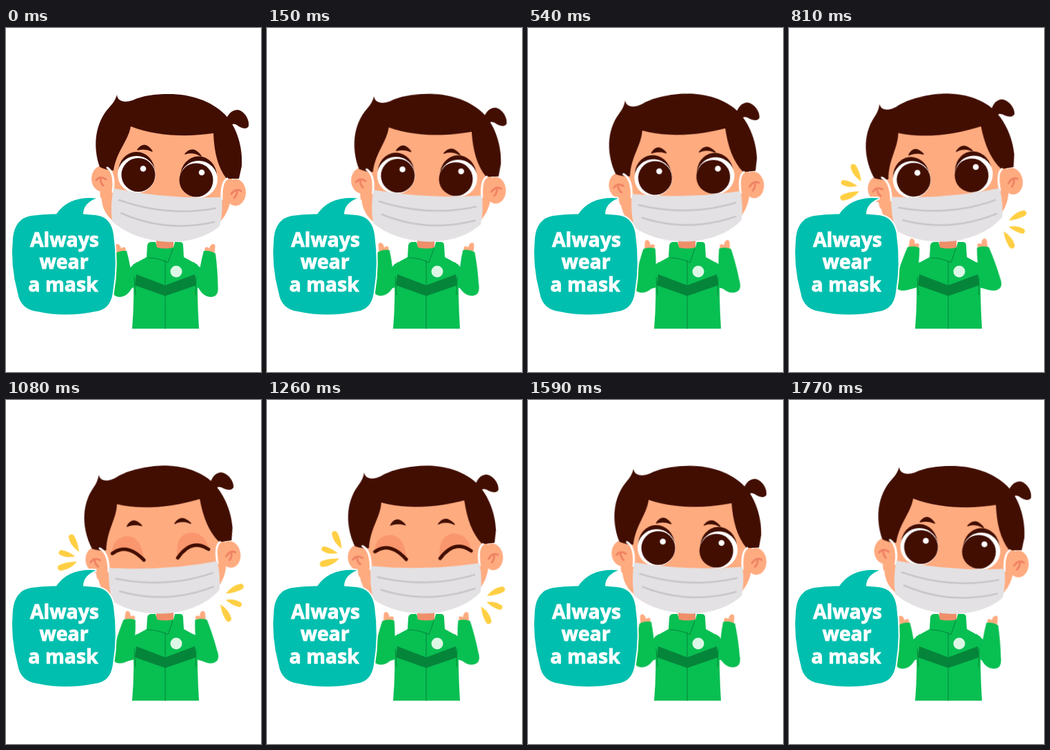
An HTML page that plays this animation: 370 by 500 pixels, repeating every 1800 ms.

```html
<!DOCTYPE html>
<html lang="en">
<head>
<meta charset="utf-8">
<title>Always wear a mask</title>
<style>
  html, body { margin: 0; width: 100%; height: 100%; overflow: hidden; background: #fff; }
  svg { display: block; width: 370px; height: 500px; }

  .head, .arm, .burst, .open, .closed { animation: 1800ms linear infinite; }
  .head { transform-origin: 229px 285px; animation-name: tilt; }
  .arm { transform-origin: 166px 378px; animation-name: lift; }
  .burst { animation-name: pop; }
  .left { transform-origin: 118px 226px; }
  .right { transform-origin: 306px 290px; }
  .open { animation-name: open; animation-timing-function: step-end; }
  .closed { animation-name: closed; animation-timing-function: step-end; }

  @keyframes tilt { 50% { transform: rotate(-10.4deg); } }
  @keyframes lift { 50% { transform: translateY(-10px) rotate(17.5deg); } }
  @keyframes pop {
    0%, 33.3% { transform: scale(0); }
    38% { transform: scale(1.12); }
    41%, 83% { transform: scale(1); }
    87%, 100% { transform: scale(0); }
  }
  @keyframes open { 0%, 72% { opacity: 1; } 52% { opacity: 0; } }
  @keyframes closed { 0%, 72% { opacity: 0; } 52% { opacity: 1; } }

  .green { fill: #08bf52; }
  .dark { fill: #05853a; }
  .skin { fill: #ffab80; }
  .hair { fill: #420e02; }
  .white { fill: #fff; }
  .line { fill: none; stroke-linecap: round; stroke-linejoin: round; }
  .brow { stroke: #420e02; stroke-width: 1.5; stroke-linejoin: round; }
  .strap { stroke: #fff; stroke-width: 3; }
  .fold { stroke: #c8c6c8; stroke-width: 2.6; }
  .ear { stroke: #ef8264; stroke-width: 3; }
  .lash { stroke: #420e02; stroke-width: 5; }
  .seam { stroke: #05853a; stroke-width: 1; }
  .spark { fill: #ffcf43; }
  .bubble { fill: #00bfae; stroke: #fff; stroke-width: 4; paint-order: stroke; }
  text {
    font: 700 28.4px "Open Sans", "Noto Sans", sans-serif;
    fill: #fff; stroke: #fff; stroke-width: .9; text-anchor: middle;
  }
</style>
</head>
<body>
<svg viewBox="0 0 370 500">
  <defs>
    <path id="drop" d="M0 0Q13 -7 24 -4.2A4.2 4.2 0 0 1 24 4.2Q13 5 0 0Z"/>
    <g id="forearm">
      <path class="skin" d="M160 329L158.500 319Q158 313.500 162 314Q166 315 167 320.500Q171 317 173.500 320Q174 324 173 329Z"/>
      <path class="green" d="M158 328Q166 323 175 324Q181 345 184 375Q177 391 164 391Q153 390 154.500 376Q155 350 158 328Z"/>
    </g>
    <path id="sleeve" class="green" d="M190 340L178 350L171 381L190 376Z"/>
  </defs>

  <!-- jacket -->
  <rect x="218" y="298" width="25" height="24" fill="#ee8f6a"/>
  <use href="#sleeve"/>
  <use href="#sleeve" transform="translate(462 0) scale(-1 1)"/>
  <path class="green" d="M204 333L205 316Q206 311 211 311H217L219 319Q231 322 243 319L245 311H252Q257 311 257 316L258 333L278 344Q277 390 280 437H183Q187 390 184 344Z"/>
  <path class="dark" d="M189 358L231 374L274 358L276 374L231 389.500L187 374Z"/>
  <path class="line seam" d="M231 338V437M206 334Q221 334 235 341L242 321M186 362L188 388M276 362L275 388"/>
  <circle cx="247" cy="354" r="8.500" fill="#dcf7e5"/>

  <g class="head">
    <g class="spark" transform="rotate(4.16 229 285)">
      <g class="burst left">
        <use href="#drop" transform="translate(111 212) rotate(-113)"/>
        <use href="#drop" transform="translate(105 218) rotate(199) scale(.87)"/>
        <use href="#drop" transform="translate(107 226) rotate(164) scale(1.050)"/>
      </g>
      <g class="burst right">
        <use href="#drop" transform="translate(319 288) rotate(-21)"/>
        <use href="#drop" transform="translate(318 297) rotate(23) scale(.87)"/>
        <use href="#drop" transform="translate(310 303) rotate(65)"/>
      </g>
    </g>

    <ellipse class="skin" cx="140" cy="219" rx="16" ry="19"/>
    <ellipse class="skin" cx="333" cy="239" rx="15" ry="19.500"/>
    <path class="skin" d="M150 135C138 180 133 226 138 254C144 279 174 305 232 307C286 307 315 288 324 258C330 230 330 180 318 135Z"/>
    <path class="line ear" d="M131 221Q137 214 145 220M137 218Q137 225 141 229M341 237Q334 232 327 241M335 236Q336 242 331 247"/>

    <path class="hair" d="M161 97C162 107 172 109 184 105C199 98 216 96 236 96C269 96 297 106 317 125C336 144 344 176 342 201L338 219H320C307 202 302 180 301 153C261 159 217 157 181 143C177 165 161 178 156 207Q146 207 136 202C126 174 128 138 151 114Q158 107 161 97Z"/>
    <path class="hair" d="M318 142C318 131 325 119 336 119C346 120 354 134 352 143C349 148 341 146 335 141Q329 137 325 143Q320 148 318 142Z"/>
    <path class="hair brow" d="M191 177Q201 163 212 179Q202 174 191 177ZM260 183Q271 170 283 186Q271 179 260 183Z"/>

    <g class="open">
      <ellipse class="hair" cx="189.500" cy="209" rx="26.500" ry="29"/>
      <ellipse class="hair" cx="279.500" cy="215.500" rx="26.500" ry="29"/>
      <ellipse class="white" cx="189.500" cy="213" rx="27.500" ry="27"/>
      <ellipse class="white" cx="279.500" cy="220" rx="27.500" ry="27"/>
      <circle class="hair" cx="192" cy="213.500" r="24.500"/>
      <circle class="hair" cx="276" cy="221" r="24.500"/>
      <circle class="white" cx="199" cy="204.500" r="4.300"/>
      <circle class="white" cx="284" cy="210" r="4.300"/>
    </g>
    <g class="closed">
      <path fill="#fa966e" d="M164 213Q166 191 188 191Q210 194 208 229Q187 200 164 213ZM257 233Q256 200 280 199Q303 203 303 227Q281 207 257 233Z"/>
      <path class="line lash" d="M164 213Q187 200 208 229M257 233Q281 207 303 227"/>
    </g>

    <path class="line strap" d="M155 238Q159 211 147 203M137 248Q139 270 154 281M313 249Q312 224 321 219M325 262Q323 277 310 287"/>
    <path fill="#e3e1e3" d="M156 233Q232 249 313 246Q315 268 310 288Q283 311 236 311Q184 308 154 281Q151 257 156 233Z"/>
    <path class="line fold" d="M164 250Q234 275 304 262M167 269Q232 298 302 282"/>
  </g>

  <g class="arm"><use href="#forearm"/></g>
  <g transform="translate(462 0) scale(-1 1)">
    <g class="arm"><use href="#forearm"/></g>
  </g>

  <path class="bubble" d="M36 273Q55 270 73 270.500Q91 244 131 247.500Q112 255 112 270.500L130 272Q152 274 156 300Q162 343 155 384Q152 409 130 412Q86 421 45 412Q21 409 17 385Q6 345 10 305Q13 277 36 273Z"/>
  <text x="85" y="317.500">Always</text>
  <text x="84" y="350">wear</text>
  <text x="83" y="382.500">a mask</text>
</svg>
</body>
</html>
```
